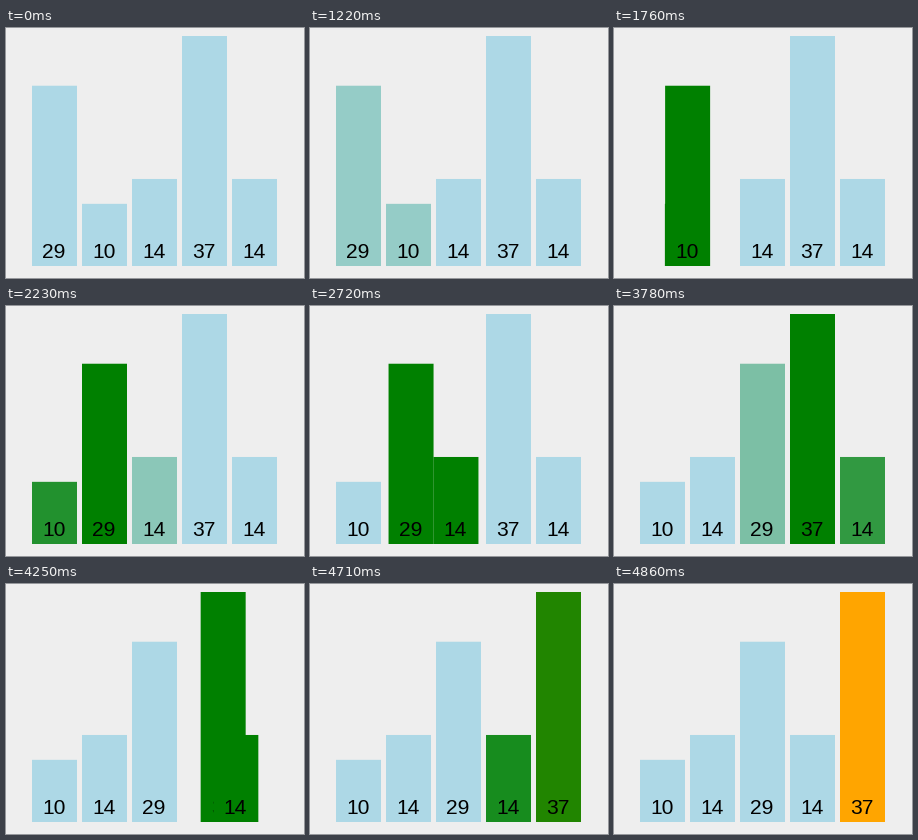
Animation of 298 by 250 pixels, one loop 5640 ms. Source, as a matplotlib script:

```python
import matplotlib.pyplot as plt
from matplotlib.animation import FuncAnimation
from matplotlib.colors import to_rgb
from matplotlib.patches import Rectangle
import numpy as np

W, H, DPI = 298, 250, 100
LOOP, STEP = 5640, 10
LEFT, PITCH, BAR_W, BASE, FULL = 26, 50, 45, 238, 230
VALUES = [29, 10, 14, 37, 14]
N = len(VALUES)
BLUE, GREEN, ORANGE = (np.array(to_rgb(c)) for c in ("lightblue", "green", "orange"))

# Times in ms: first action, gap between actions, length of each transition
START, BEAT, DURATION = 1131, 499, 250
# The picture refreshes at a fixed rate
TICK, PHASE = 77.6, 48


def bubble_pass():
    """Yield (new colours, new slots) by bar for each step of one sorting pass."""
    order = list(range(N))
    for j in range(N - 1):
        fades = {order[j]: GREEN, order[j + 1]: GREEN}
        if j:
            fades[order[j - 1]] = BLUE
        yield fades, {}
        a, b = order[j], order[j + 1]
        if VALUES[a] > VALUES[b]:
            order[j], order[j + 1] = b, a
            yield {}, {a: j + 1, b: j}
    yield {order[-2]: BLUE, order[-1]: ORANGE}, {}


ACTIONS = list(bubble_pass())


def ease(u):
    """Cubic in-out."""
    u = min(max(u, 0), 1)
    return 4 * u**3 if u < 0.5 else 1 - 4 * (1 - u) ** 3


def state(t):
    slots = [float(i) for i in range(N)]
    colors = [BLUE] * N
    for n, (fades, moves) in enumerate(ACTIONS):
        k = ease((t - START - n * BEAT) / DURATION)
        for i, c in fades.items():
            colors[i] = colors[i] + (c - colors[i]) * k
        for i, s in moves.items():
            slots[i] += (s - slots[i]) * k
    return slots, colors


fig = plt.figure(figsize=(W / DPI, H / DPI), dpi=DPI, facecolor="#eeeeee")
ax = fig.add_axes([0, 0, 1, 1])
ax.set(xlim=(0, W), ylim=(H, 0))
ax.axis("off")

bars, labels = [], []
for i, v in enumerate(VALUES):
    h = v / max(VALUES) * FULL
    bar = Rectangle((0, BASE - h), BAR_W, h, lw=0, snap=False, zorder=i)
    bars.append(ax.add_patch(bar))
    labels.append(ax.text(0, 230, str(v), ha="center", va="baseline", color="black",
                          family="Liberation Sans", size=21 * 72 / DPI,
                          zorder=i + 0.5))


def update(frame):
    t = frame * STEP
    shown = (t - PHASE) // TICK * TICK + PHASE
    for bar, label, slot, color in zip(bars, labels, *state(shown)):
        x = LEFT + PITCH * slot
        bar.set_x(x)
        bar.set_facecolor(color)
        label.set_x(x + BAR_W // 2)
    return bars + labels


anim = FuncAnimation(fig, update, frames=LOOP // STEP, interval=STEP,
                     repeat=True, repeat_delay=0)
plt.show()
```
